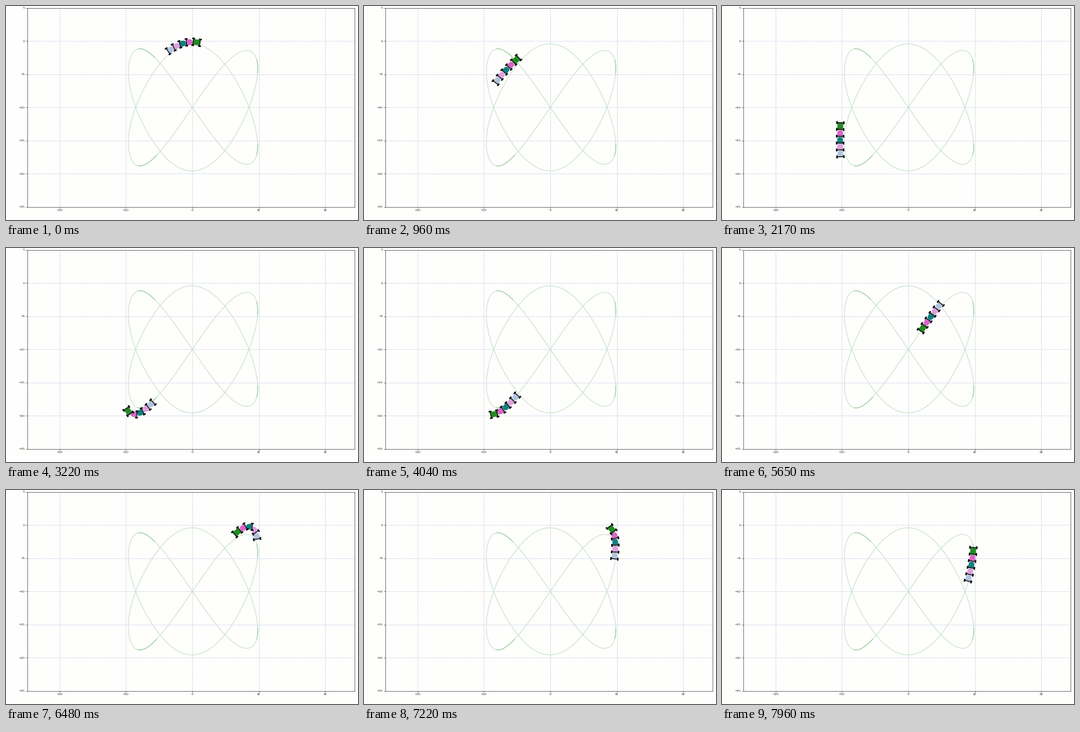
A matplotlib script that plays this animation: 512 by 313 pixels, repeating every 8 s.

```python
import numpy as np
import matplotlib.pyplot as plt
from matplotlib.animation import FuncAnimation
from matplotlib.collections import LineCollection
from matplotlib.patches import Polygon

W, H, DPI = 512, 313, 100
PX = 72 / DPI              # one pixel in points
LOOP, STEP = 8000, 40
LINK = 1.03                # distance between axles
LEFT, RIGHT, TOP, BOTTOM = 30.5, 507, 3, 293.5
BG = "#fefefd"
BODY = ["#228b22", "#d865c9", "#0f8080", "#dda0dd", "#b0c4de"]


def track(lo, hi):
    """Painted 2:3 Lissajous curve, its lobes flatter than its middle."""
    s = np.radians(np.linspace(lo, hi, max(30, int(2 * (hi - lo)))))
    u, c = -np.sin(2 * s), np.cos(3 * s)
    x = 9.85 * u + 0.25 * (u * u - u) * c * c
    return x, -10 + (9.6 - 1.2 * u * u - 0.15 * u) * c


def route(deg):
    """Path of the train: a slightly larger curve that drifts out on the left."""
    s = np.radians(deg)
    u = -np.sin(2 * s)
    drift = 1.25 * np.exp(-((deg - 27) / 10) ** 2)
    return 10 * u - 0.2 * u * u - drift, -10 + 9.9 * np.cos(3 * s)


def phase(t):
    """Route angle of the front axle; it hesitates in the sharp lower turn."""
    return -3.3 + 17.5 * t - 9 * np.exp(-((t - 3.9) / 0.5) ** 2)


DEG = np.linspace(-10, 180, 2000)
RX, RY = route(DEG)
ARC = np.concatenate([[0], np.cumsum(np.hypot(np.diff(RX), np.diff(RY)))])

fig = plt.figure(figsize=(W / DPI, H / DPI), dpi=DPI, facecolor=BG)
ax = fig.add_axes([LEFT / W, 1 - BOTTOM / H, (RIGHT - LEFT) / W, (BOTTOM - TOP) / H],
                  facecolor=BG)
ax.set_xlim((LEFT - 271) / 9.66, (RIGHT - 271) / 9.66)
ax.set_ylim(-25, 5)
ax.set_xticks(range(-20, 21, 10))
ax.set_yticks(range(-25, 6, 5))
ax.tick_params(length=1.6 * PX, width=0.7 * PX, pad=1.4 * PX,
               labelsize=4.2 * PX, color="#444444", labelcolor="#222222")
ax.grid(color="#d6d6ea", lw=0.9 * PX, ls=(0, (2, 1)))
ax.set_axisbelow(True)
for spine in ax.spines.values():
    spine.set(color="#6c6c6c", linewidth=0.8 * PX)

ax.plot(*track(0, 360), color="#c9e2cc", lw=1 * PX)
for lo, hi in [(60, 73), (130, 137), (240, 252), (310, 316)]:
    ax.plot(*track(lo, hi), color="#9ccf9c", lw=1 * PX)

# Body outlines along (first) and across (second) a link of unit length
CAR = np.array([(0.02, -0.42), (0.02, 0.42), (0.98, 0.42), (0.98, -0.42)])
TRAILER = np.array([(0.1, -0.25), (0.1, 0.25), (0.45, 0.42),
                    (0.96, 0.42), (0.96, -0.42), (0.45, -0.42)])
shapes = [CAR] + [TRAILER] * 4
bodies = [ax.add_patch(Polygon(s, closed=True, fc=c, ec="none", zorder=5))
          for s, c in zip(shapes, BODY)]
axles = LineCollection([], colors="black", linewidths=1.2 * PX, zorder=6)
wheels = LineCollection([], colors="black", linewidths=2.1 * PX, zorder=7)
ax.add_collection(axles)
ax.add_collection(wheels)


def draw(frame):
    start = np.interp(phase(frame * STEP / 1000), DEG, ARC)
    along = start + LINK * np.arange(len(BODY) + 1)
    points = np.column_stack([np.interp(along, ARC, RX), np.interp(along, ARC, RY)])
    links = np.diff(points, axis=0)
    bars, tyres = [], []
    for body, shape, p, d in zip(bodies, shapes, points, links):
        body.set_xy(p + shape @ np.array([d, (-d[1], d[0])]))
    for p, d in zip(points, [links[0], *links]):
        n = np.array([-d[1], d[0]])
        bars.append([p - 0.52 * n, p + 0.52 * n])
        for hub in (p - 0.5 * n, p + 0.5 * n):
            tyres.append([hub - 0.21 * d, hub + 0.21 * d])
    axles.set_segments(bars)
    wheels.set_segments(tyres)
    return [*bodies, axles, wheels]


anim = FuncAnimation(fig, draw, frames=LOOP // STEP, interval=STEP,
                     repeat=True, repeat_delay=0, blit=False)
plt.show()
```
